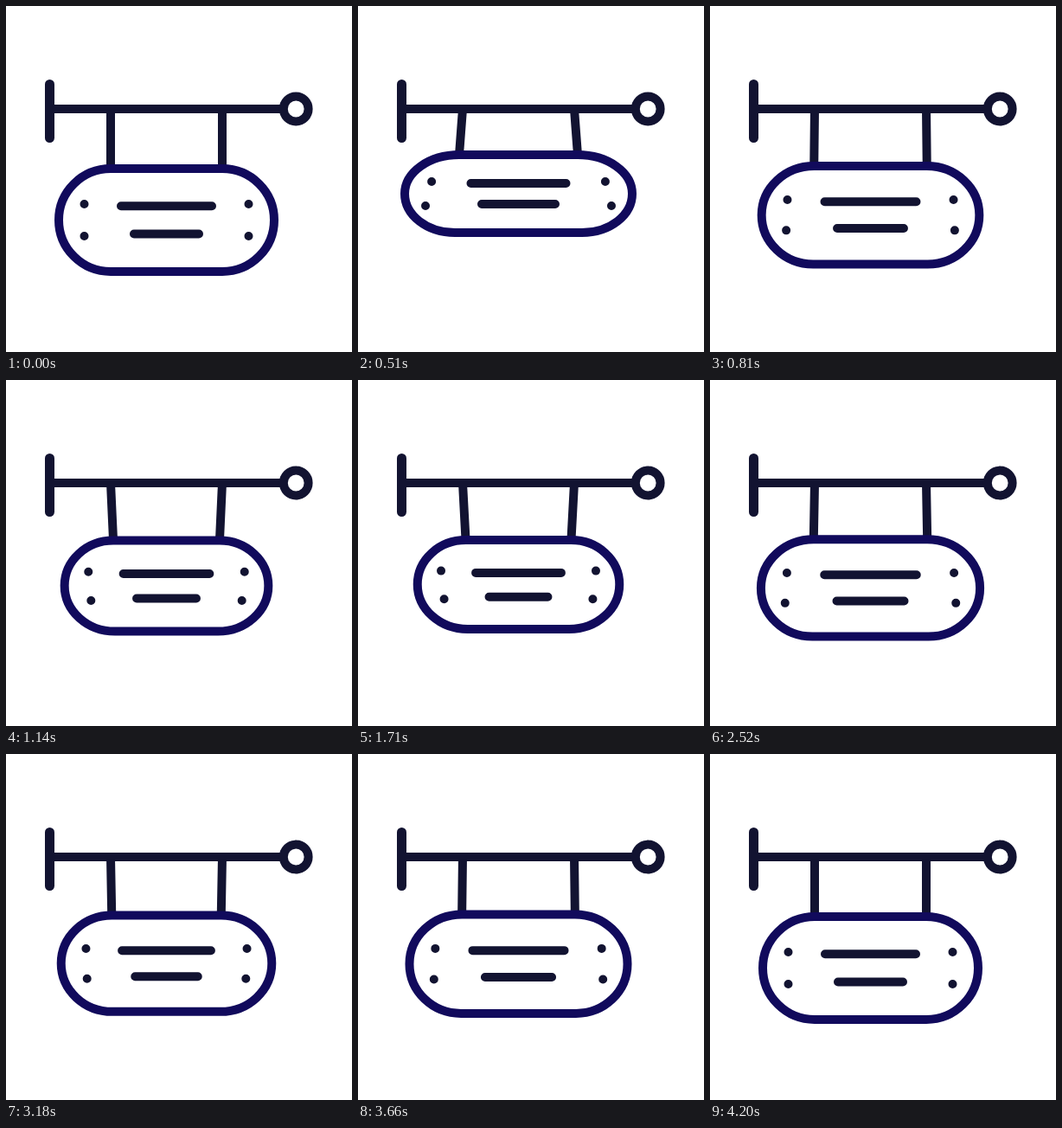
An HTML page for the animation above (6230 ms loop, 400 px wide and 400 px high).

```html
<!DOCTYPE html>
<html lang="en">
<head>
<meta charset="utf-8">
<title>Swinging sign</title>
<style>
html, body { margin: 0; width: 100%; height: 100%; overflow: hidden; background: #fff; }
svg { display: block; width: 100%; height: 100%; }
</style>
</head>
<body>
<svg viewBox="0 0 400 400" fill="none" stroke="#121331" stroke-width="10">
  <path id="hangers"/>
  <path d="M50.5 119H321"/>
  <path d="M50.5 90.5V152.5" stroke-width="11" stroke-linecap="round"/>
  <circle cx="335.2" cy="119" r="14.4"/>
  <path id="plate" stroke="#110a5c"/>
  <path id="marks" stroke-linecap="round"/>
</svg>
<script>
const LOOP = 6230, STEP = 30, CX = 185.5, BAR = 119, KAPPA = 0.5523;

// Each measure: at rest, change when swung forward, change when swung back.
// Widths are half-widths around CX.
const widths = {
  hang: [64.5, 4, -8],
  foot: [64.5, 9, -13],
  side: [124.5, 7, -17.5],
  dotA: [95, 5.4, -12.5],
  dotB: [95, 12.5, -20.5],
  lineA: [52.5, 2.5, -7],
  lineB: [37.5, 5, -8]
};
const heights = {
  top: [188, -16, -6.5],
  mid: [247.5, -30.5, -25.5],
  bottom: [307, -45, -43],
  dotAY: [229, -26, -19],
  dotBY: [266, -35, -29],
  lineAY: [231.3, -26.3, -19],
  lineBY: [263.5, -34.5, -29]
};

// Time, swing for widths, swing for heights; positive is forward.
const keys = [
  [0, 0, 0], [500, 1, 1], [930, 0, 0], [1430, -1, -1], [1950, 0, 0],
  [2320, 0.68, 0.53], [2690, 0, 0], [3040, -0.235, -0.32], [3400, 0, 0],
  [3800, 0.3, 0.22], [4200, 0, 0], [LOOP, 0, 0]
];

const byId = id => document.getElementById(id);
const hangers = byId('hangers'), plate = byId('plate'), marks = byId('marks');

function swingAt(t) {
  const i = keys.findIndex(k => k[0] > t);
  const a = keys[i - 1], b = keys[i];
  const u = (t - a[0]) / (b[0] - a[0]);
  const e = u * u * (3 - 2 * u);
  return [1, 2].map(n => a[n] + (b[n] - a[n]) * e);
}

function pose(table, swing, out) {
  for (const name in table) {
    const [rest, forward, back] = table[name];
    out[name] = rest + (swing > 0 ? forward * swing : -back * swing);
  }
}

// Quarter oval that leaves (x0, y0) sideways or upright.
function corner(x0, y0, x1, y1, sideways) {
  const dx = (x1 - x0) * KAPPA, dy = (y1 - y0) * KAPPA;
  return sideways
    ? `C${x0 + dx} ${y0} ${x1} ${y1 - dy} ${x1} ${y1}`
    : `C${x0} ${y0 + dy} ${x1 - dx} ${y1} ${x1} ${y1}`;
}

const line = (half, y) => `M${CX - half} ${y}H${CX + half}`;
const dots = (half, y) => `M${CX - half} ${y}h.01M${CX + half} ${y}h.01`;

function draw(t) {
  const [wide, high] = swingAt(t), p = {};
  pose(widths, wide, p);
  pose(heights, high, p);
  const { hang, foot, side, top, mid, bottom } = p;

  hangers.setAttribute('d', [-1, 1].map(s =>
    `M${CX + s * 64.5} ${BAR}L${CX + s * hang} ${top}`).join(''));

  plate.setAttribute('d',
    `M${CX - hang} ${top}H${CX + hang}` +
    corner(CX + hang, top, CX + side, mid, true) +
    corner(CX + side, mid, CX + foot, bottom, false) +
    `H${CX - foot}` +
    corner(CX - foot, bottom, CX - side, mid, true) +
    corner(CX - side, mid, CX - hang, top, false) + 'Z');

  marks.setAttribute('d',
    dots(p.dotA, p.dotAY) + dots(p.dotB, p.dotBY) +
    line(p.lineA, p.lineAY) + line(p.lineB, p.lineBY));
}

const start = performance.now();
function tick() {
  const t = (performance.now() - start) % LOOP;
  draw(Math.floor(t / STEP) * STEP);
  requestAnimationFrame(tick);
}
tick();
</script>
</body>
</html>
```
